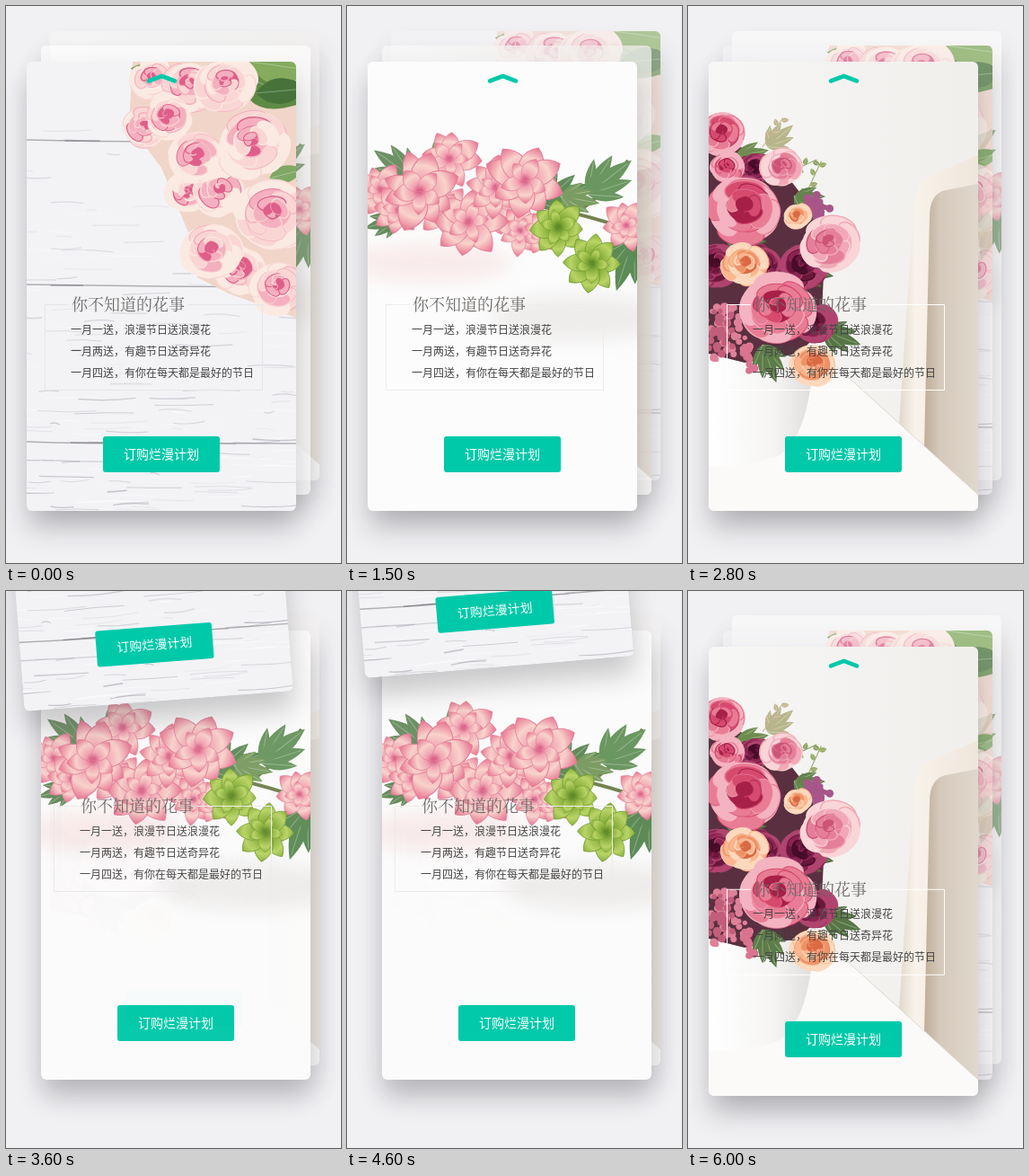
An HTML page that plays this animation: 373x620 px, repeating every 6.6 s.

```html
<!DOCTYPE html>
<html lang="zh">
<head>
<meta charset="utf-8">
<style>
html, body { margin: 0; width: 100%; height: 100%; overflow: hidden; background: #f1f1f4; }
svg { display: block; width: 100%; height: 100%; }
text { font-family: "Noto Sans CJK SC", "Noto Sans CJK", sans-serif; }
.title { font-family: "Noto Serif CJK SC", "Noto Sans CJK SC", "Noto Sans CJK", serif; font-size: 18px; font-weight: 300; fill: #6d6a68; }
.line { font-size: 12px; fill: #444; }
.label { font-size: 14px; font-weight: 300; fill: #fff; text-anchor: middle; }
</style>
</head>
<body>
<svg id="stage" viewBox="0 0 373 620">
  <defs>
    <clipPath id="card"><rect width="300" height="500" rx="6"/></clipPath>
    <filter id="shade" x="-30%" y="-30%" width="160%" height="160%"><feGaussianBlur stdDeviation="15"/></filter>
    <filter id="soft" x="-50%" y="-50%" width="200%" height="200%"><feGaussianBlur stdDeviation="10"/></filter>
    <linearGradient id="wall"><stop offset="0" stop-color="#f7f7f6"/><stop offset=".55" stop-color="#f3f2f0"/><stop offset="1" stop-color="#f1efec"/></linearGradient>
    <linearGradient id="panel"><stop stop-color="#bfae98"/><stop offset=".3" stop-color="#d5c9bb"/><stop offset="1" stop-color="#e0d8cd"/></linearGradient>
    <linearGradient id="rim"><stop stop-color="#e2d8cb"/><stop offset=".2" stop-color="#f8f2ea"/><stop offset="1" stop-color="#efe6db"/></linearGradient>
    <linearGradient id="vase"><stop stop-color="#fff"/><stop offset=".6" stop-color="#f6f5f4"/><stop offset="1" stop-color="#dfdddb"/></linearGradient>
    <radialGradient id="blush" gradientUnits="userSpaceOnUse" cx="0" cy="0" r="1">
      <stop stop-color="#d04a78"/><stop offset=".3" stop-color="#f2a3b2"/><stop offset=".65" stop-color="#f9d3cc"/><stop offset="1" stop-color="#e8718f"/>
    </radialGradient>
    <radialGradient id="lime" gradientUnits="userSpaceOnUse" cx="0" cy="0" r="1">
      <stop stop-color="#4f7a20"/><stop offset=".35" stop-color="#86ad3a"/><stop offset=".75" stop-color="#b9d465"/><stop offset="1" stop-color="#8bb03f"/>
    </radialGradient>
  </defs>
</svg>
<script>
const stage = document.getElementById('stage');
let seed = 7;
const rand = (lo = 0, hi = 1) => {
  seed = (seed * 16807) % 2147483647;
  return lo + (hi - lo) * seed / 2147483647;
};
const repeat = (n, draw) => Array.from({ length: n }, (_, i) => draw(i)).join('');
const clamp = x => Math.min(1, Math.max(0, x));
const smooth = x => (x = clamp(x), x * x * (3 - 2 * x));
const mix = (a, b, k) => a + (b - a) * k;

// ---- plants ----
const PINK = ['#fbeae2', '#f9d6d4', '#f4b0bf', '#df5f8a'];
const PEONY = ['#f4b3c0', '#e97c95', '#d64a6e', '#a62048'];
const PEACH = ['#fcd9bd', '#f8b78f', '#ef9266', '#d96a44'];
const PLUM = ['#b0446f', '#8a2450', '#6a173c', '#470c27'];
const BLUSH = ['#f9d5d8', '#f1a9b6', '#e57f98', '#cc5576'];

// Loose rings of cupped petals, darker toward the heart.
function rose(x, y, r, tones) {
  const tone = i => tones[Math.max(0, Math.min(3, i))];
  const rings = repeat(4, ring => {
    const turn = rand(0, 90), count = [8, 7, 5, 4][ring];
    return repeat(count, i => {
      const size = r * [.42, .34, .26, .13][ring] * rand(.85, 1.15);
      const dist = r * [.62, .43, .24, .1][ring] * rand(.85, 1.1);
      const shade = ring + (rand() < .3) - (rand() < .3);
      return `<ellipse cx="${dist}" rx="${size * .75}" ry="${size * 1.25}" fill="${tone(shade)}" stroke="${tone(shade + (rand() < .6 ? -1 : 1))}"
        stroke-width="${rand(.6, 1.8)}" transform="rotate(${turn + (i * 360 + rand(-60, 60)) / count})"/>`;
    }).replace(/^/, `<g transform="translate(0 ${-r * .05 * ring})">`) + '</g>';
  });
  return `<g transform="translate(${x} ${y}) rotate(${rand(-20, 20)}) scale(1 .9)"><circle r="${r * .7}" fill="${tone(1)}"/>${rings}</g>`;
}

function leaf(x, y, length, angle, fill = '#6f9a5c', width = .32) {
  const w = length * width;
  return `<g transform="translate(${x} ${y}) rotate(${angle})">
    <path d="M0 0Q${length * .4} ${-w * 1.5} ${length} 0Q${length * .4} ${w * 1.5} 0 0" fill="${fill}"/>
    <path d="M0 0H${length * .9}" stroke="#fff" stroke-opacity=".3"/></g>`;
}

const frond = (x, y, length, angle, fill) =>
  [-42, -20, 0, 20, 42].map(a => leaf(x, y, length * (1 - Math.abs(a) / 120), angle + a, fill, .2)).join('');

function sprig(x, y, length, angle, fill) {
  const pairs = repeat(4, i => leaf(length * (.3 + i * .2), 0, 9, i % 2 ? 50 : -50, fill, .4));
  return `<g transform="translate(${x} ${y}) rotate(${angle})"><path d="M0 0H${length}" stroke="${fill}"/>${pairs}</g>`;
}

function lily(x, y, r, fill = 'blush', edge = '#e27f98') {
  const petal = (size, angle) => `<path d="M0 0C.2 -.5 .75 -.42 1 0C.75 .42 .2 .5 0 0" fill="url(#${fill})" stroke="${edge}"
    stroke-width=".025" transform="rotate(${angle}) scale(${size} ${size * rand(.75, 1)})"/>`;
  return `<g transform="translate(${x} ${y}) rotate(${rand(0, 50)}) scale(${r})">
    ${repeat(8, i => petal(rand(.85, 1.08), i * 45 + rand(-8, 8)))}${repeat(5, i => petal(rand(.5, .68), i * 72 + rand(-12, 12)))}</g>`;
}

const all = (draw, rows, ...rest) => rows.map(row => draw(...row, ...rest)).join('');

// ---- photographs ----
function wood() {
  const streaks = repeat(190, () => {
    const y = 500 * Math.pow(rand(), .55), x = rand(-40, 290), len = rand(10, 70);
    return `<path d="M${x} ${y}q${len / 2} ${rand(-3, 3)} ${len} ${rand(-2, 2)}" stroke="${rand() < .4 ? '#fff' : '#a9a6b0'}"
      stroke-width="${rand(.5, 1.5)}" opacity="${rand(.12, .22 + y / 1100)}"/>`;
  });
  const cracks = [87, 248, 423].map(y => `<path d="M0 ${y}q70 ${rand(-3, 3)} 150 2t150 0" stroke="#8d8a90" stroke-width="1.4" opacity=".65"/>
    <path d="M${rand(0, 60)} ${y + 1}h${rand(30, 70)}" stroke="#56525a" opacity=".6"/>`).join('');
  return `<rect width="300" height="500" fill="#f3f3f6"/><g fill="none">${streaks}${cracks}</g>
    <path d="M118 0L114 70 150 118 180 190 190 240 225 258 300 285V0Z" fill="#f1d5c9"/>
    ${leaf(235, 12, 80, 25, '#5f8a45', .4)}${leaf(248, 0, 70, 8, '#84ab5e', .4)}${leaf(255, 35, 60, -5, '#47733a')}
    ${leaf(270, 130, 40, -15, '#7fa863')}${leaf(160, 15, 45, 190, '#88a96c')}
    ${all(rose, [[140, 20, 27], [182, 28, 32], [222, 26, 36], [130, 74, 26], [158, 62, 28], [180, 146, 26], [215, 145, 32],
      [190, 107, 34], [252, 92, 44], [238, 232, 30], [206, 212, 36], [280, 252, 34], [274, 172, 46]], PINK)}`;
}

function spray() {
  return `<rect width="300" height="500" fill="#fcfcfc"/>
    <g filter="url(#soft)"><ellipse cx="235" cy="285" rx="100" ry="26" fill="#efedec"/><ellipse cx="70" cy="224" rx="90" ry="22" fill="#f9ebeb"/></g>
    <path d="M180 160Q230 165 300 190M215 175Q250 165 290 110" fill="none" stroke="#72824f" stroke-width="4"/>
    ${frond(52, 130, 55, 215, '#6d9164')}${frond(74, 108, 34, -45, '#7c9d6b')}${frond(35, 175, 40, 165, '#648b5b')}
    ${frond(195, 158, 58, -22, '#608b58')}${frond(245, 148, 62, -38, '#6a9660')}${frond(296, 196, 62, 108, '#5c8b56')}
    ${frond(215, 150, 44, 10, '#7a9c62')}
    ${all(lily, [[14, 142, 30], [34, 165, 30], [86, 165, 32], [91, 108, 34], [140, 165, 32], [170, 188, 28], [195, 190, 24],
      [112, 178, 42], [142, 140, 34], [58, 144, 44], [175, 132, 44], [288, 182, 28]])}
    ${lily(212, 184, 32, 'lime', '#6f9a2c')}${lily(250, 224, 34, 'lime', '#6f9a2c')}`;
}

function vase() {
  const berries = (cx, cy, n, spread, fill) => repeat(n, () =>
    `<circle cx="${cx + spread * rand(-1, 1) * rand()}" cy="${cy + spread * rand(-1, 1)}" r="${rand(2.5, 5)}" fill="${fill}"/>`);
  return `<rect width="300" height="500" fill="url(#wall)"/>
    <path d="M228 168Q228 132 254 124L300 104V490L240 430 212 402Z" fill="url(#rim)"/>
    <path d="M246 172Q246 147 264 143L300 136V490L240 430Z" fill="url(#panel)"/>
    <path d="M0 330H132L300 482V500H0Z" fill="#fcfaf8"/><path d="M132 330L300 482" stroke="#ddd8d2"/>
    <path d="M0 318H118Q112 425 74 440Q40 452 0 450Z" fill="url(#vase)"/>
    <path d="M0 70L35 95 70 105 105 150 130 195 125 300 100 325 40 335 0 325Z" fill="#5a3040"/>
    ${frond(65, 95, 38, -40, '#b6b58a')}${frond(30, 105, 45, 10, '#6e8c50')}
    ${sprig(100, 165, 60, -65, '#93a85f')}${sprig(60, 95, 40, -55, '#c2b38f')}${sprig(75, 130, 50, -25, '#8ba15f')}
    ${frond(128, 300, 44, 20, '#567545')}${frond(60, 315, 45, 70, '#5c7c48')}${frond(95, 150, 42, 20, '#64824c')}
    ${frond(20, 200, 45, 0, '#4d6b3e')}${frond(90, 230, 50, 10, '#52703f')}
    ${berries(120, 165, 34, 18, '#a8558a')}${berries(20, 302, 50, 30, '#df8199')}${berries(12, 300, 30, 28, '#c25e7c')}${berries(45, 330, 16, 14, '#d9738f')}
    ${all(rose, [[8, 228, 29], [105, 228, 28], [118, 292, 26], [52, 118, 20], [60, 225, 24]], PLUM)}
    ${all(rose, [[15, 80, 29], [20, 118, 20], [40, 165, 46]], PEONY)}
    ${all(rose, [[82, 118, 25], [135, 204, 36]], BLUSH)}
    ${all(rose, [[40, 226, 28], [99, 172, 17], [115, 338, 28]], PEACH)}
    ${rose(76, 277, 46, PEONY)}`;
}

// ---- cards ----
const LINES = ['一月一送，浪漫节日送浪漫花', '一月两送，有趣节日送奇异花', '一月四送，有你在每天都是最好的节日'];

function makeCard(photo, border) {
  const node = document.createElementNS('http://www.w3.org/2000/svg', 'g');
  node.innerHTML = `
    <rect y="20" width="300" height="500" rx="6" fill="#55555a" opacity=".3" filter="url(#shade)"/>
    <g clip-path="url(#card)">${photo}</g>
    <g class="copy">
      <path d="M47 270.5H20.5V365.5H262.5V270.5H180" fill="none" stroke="${border}"/>
      <text class="title" x="50" y="277">你不知道的花事</text>
      ${LINES.map((line, i) => `<text class="line" x="49" y="${302.5 + 24 * i}">${line}</text>`).join('')}
    </g>
    <rect x="85" y="417" width="130" height="40" rx="3" fill="#00c9a9"/>
    <text class="label" x="150" y="442">订购烂漫计划</text>
    <path class="arrow" d="M136 21.5L150.5 16 165 21.5" fill="none" stroke="#00c9a9" stroke-width="4.6" stroke-linecap="round" stroke-linejoin="round"/>`;
  return { node, copy: node.querySelector('.copy'), arrow: node.querySelector('.arrow') };
}

const cards = {
  A: makeCard(wood(), '#e6e6e8'),
  B: makeCard(spray(), '#ededed'),
  C: makeCard(vase(), '#fff')
};

// ---- motion ----
const LOOP = 6600, STEP = 100, RISE = 390, SETTLE = 200;
const SLOTS = [[23, 62], [39, 44], [49, 28]];
const PEAK = { x: -2, y: -438, turn: -5 };
const MOVES = [
  { at: 900, from: 'ABC', lead: 113 },
  { at: 2200, from: 'BCA', lead: 14 },
  { at: 3300, from: 'CAB', rewind: true },
  { at: 4400, from: 'ABC', lead: 139 },
  { at: 5500, from: 'BCA', lead: 84 }
];

function slot(depth) {
  const i = Math.min(1, Math.floor(depth)), k = depth - i;
  return { x: mix(SLOTS[i][0], SLOTS[i + 1][0], k), y: mix(SLOTS[i][1], SLOTS[i + 1][1], k), turn: 0, depth };
}

const between = (a, b, k) => ({ x: mix(a.x, b.x, k), y: mix(a.y, b.y, k), turn: mix(a.turn, b.turn, k), depth: a.depth });

function place(name, pose, lift = 0) {
  const { node, copy, arrow } = cards[name];
  const { x, y, turn, depth } = pose;
  const active = clamp(1 - depth);
  const opacity = depth <= 1 ? 1 - .25 * depth * (1 - lift) : mix(.75 + .25 * lift, .6, depth - 1);
  node.setAttribute('transform', `translate(${x} ${y}) rotate(${turn} 150 250)`);
  node.setAttribute('opacity', opacity);
  copy.setAttribute('transform', `translate(${-6 * (1 - active)} ${-75 * (1 - active)})`);
  arrow.setAttribute('opacity', active);
}

let stacked = '';
function stack(order) {
  if (order === stacked) return;
  stacked = order;
  [...order].reverse().forEach(name => stage.append(cards[name].node));
}

function sendBack([top, next, last], time) {
  const settle = smooth((time - RISE) / SETTLE), lift = smooth(time / RISE);
  const falling = time > RISE;
  stack(falling ? next + last + top : top + next + last);
  place(top, falling ? between({ ...PEAK, depth: 2 }, slot(2), settle) : between(slot(0), PEAK, lift));
  place(next, slot(1 - settle), lift);
  place(last, slot(2 - settle), lift * (1 - settle));
}

// The middle card slips out behind the top one and lands in front.
function bringFront([top, middle, last], time) {
  const out = smooth((time + 40) / 240), lift = 1 - smooth((time - 216) / 384);
  const landing = time >= 216;
  stack(landing ? middle + last + top : top + middle + last);
  place(middle, landing ? between(slot(0), PEAK, lift) : between(slot(1), PEAK, out), 1);
  place(last, slot(2 - out), landing ? lift : out);
  place(top, slot(2 * out));
}

function draw(now) {
  const time = Math.floor((now % LOOP) / STEP) * STEP;
  const move = MOVES.filter(m => m.at <= time).pop();
  if (!move) sendBack('ABC', 0);
  else if (move.rewind) bringFront(move.from, time - move.at);
  else sendBack(move.from, time - move.at + move.lead);
}

const start = performance.now();
function tick() {
  draw(performance.now() - start);
  requestAnimationFrame(tick);
}
tick();
</script>
</body>
</html>
```
